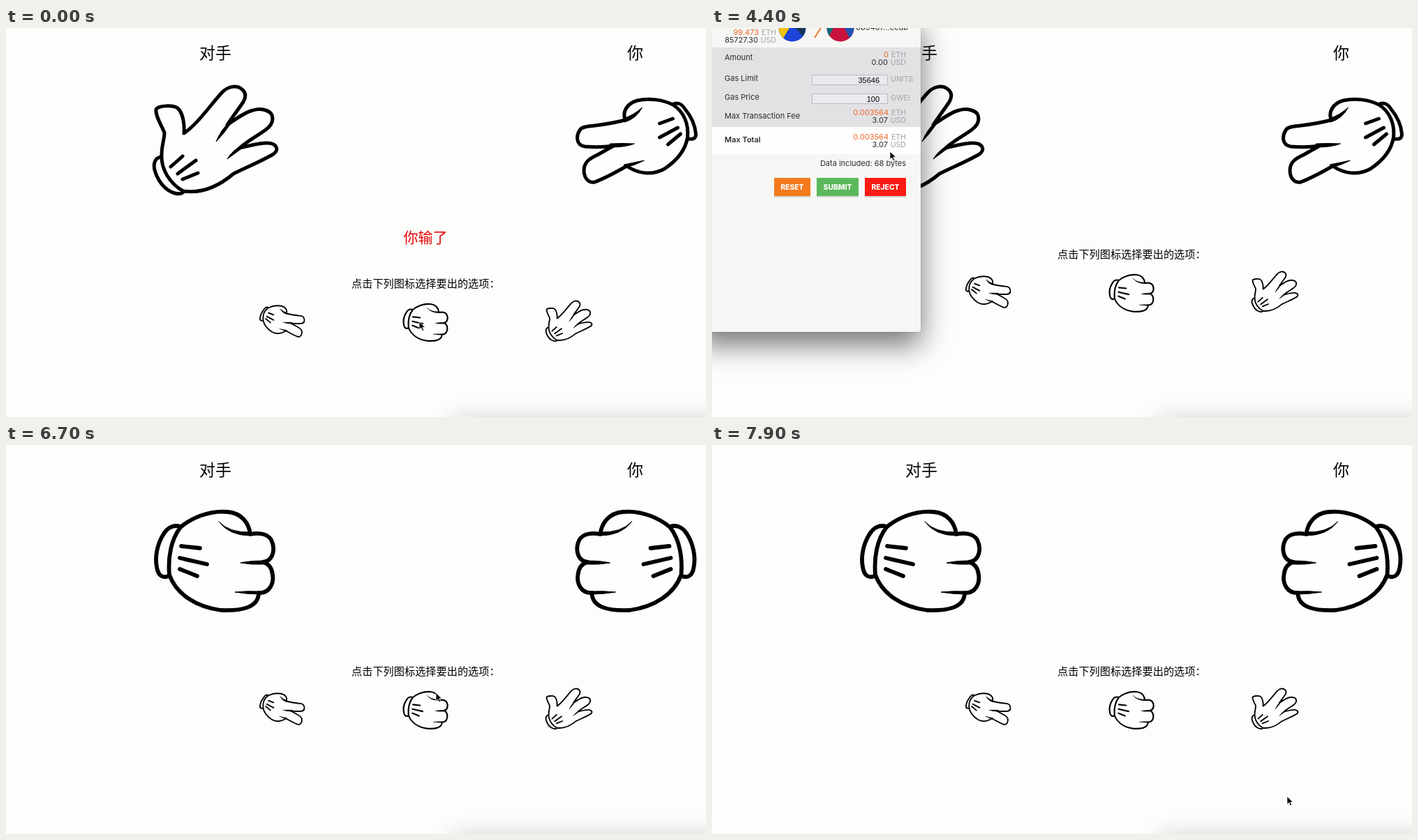
Recreate the animation shown at these times as an HTML page. Size 1003 by 558 pixels, loop 8 s.

```html
<!DOCTYPE html>
<html lang="zh-CN">
<head>
<meta charset="utf-8">
<style>
html, body { margin: 0; width: 100%; height: 100%; overflow: hidden; background: #fdfdfc; }
#stage { position: relative; width: 100%; height: 100%; overflow: hidden; contain: strict; }
svg { position: absolute; left: 0; top: 0; width: 100%; height: 100%; }
.cjk { font-family: "Noto Sans CJK SC", "Noto Sans CJK", sans-serif; }
.hand { fill: #fefefe; stroke: #000; stroke-width: 5; stroke-linecap: round; stroke-linejoin: round; }
#rock { stroke-width: 5.8; }
.wedge { fill: #000; stroke-width: 1; }
#edge { position: absolute; left: 640px; top: 562px; width: 420px; height: 40px; box-shadow: 0 0 36px rgba(0,0,0,.2); }
#popup { position: absolute; left: -20px; top: -20px; width: 319px; height: 456px; background: #fdfdfc;
  border-radius: 0 0 4px 0; box-shadow: 0 0 1px rgba(0,0,0,.6), 0 18px 42px rgba(0,0,0,.55); }
#form { left: 20px; top: 20px; width: 299px; height: 436px; font: 11px Inter, sans-serif; fill: #2c2c2c; }
#form .end { text-anchor: end; }
#form .eth { fill: #f0662b; }
#form .unit { fill: #a3a3a6; font-size: 10.6px; }
#form .btn { fill: #fff; font-weight: 800; font-size: 10.3px; text-anchor: middle; }
</style>
</head>
<body>
<div id="stage">
<div id="edge"></div>
<svg>
  <defs>
    <g id="scissors" class="hand">
      <path d="M245 109C238 106 233 109 228 117C219 128 214 141 213 152C213 159 217 160 224 159"/>
      <path d="M314 132C319 121 312 108 297 104C280 100 260 103 246 110C230 120 223 138 225 157C228 175 240 190 258 202C276 212 296 209 312 198C326 206 342 215 358 221C368 223 375 213 373 200C371 190 362 186 354 182L331 169C345 171 360 171 372 170C385 168 385 155 379 146C376 141 366 141 358 140C342 138 326 135 314 132Z"/>
      <path d="M265 137L246 130M265 157L239 143M253 167L235 152"/>
      <path class="wedge" d="M334 171Q314 171 301 166Q318 165 336 166ZM314 200Q300 197 287 190Q302 193 316 196ZM315 135Q298 130 290 114Q302 125 317 130Z"/>
    </g>
    <g id="rock" class="hand">
      <path d="M250 117C240 114 231 118 225 129C217 142 213 160 216 175C218 189 226 191 233 188"/>
      <path d="M350 128C348 112 338 98 318 96C290 93 264 106 250 118C236 136 232 162 234 186C244 214 272 232 308 237C336 238 362 234 362 212C378 213 384 198 382 186C381 176 376 170 368 168C384 166 386 148 380 136C374 126 360 126 350 128Z"/>
      <path d="M251 145L278 148M249 162L288 171M249 178L274 188"/>
      <path class="wedge" d="M305 110Q320 126 350 125L350 130Q320 130 305 110ZM368 166Q350 166 336 169Q352 172 368 171ZM362 210Q346 209 328 211Q346 214 362 214Z"/>
    </g>
    <g id="paper" class="hand">
      <path d="M222 185C213 186 210 196 214 207C219 222 230 234 242 237C249 239 253 237 255 234"/>
      <path d="M254 234C236 224 222 204 223 182C223 168 227 160 227 150C222 138 214 126 215 117C217 111 240 110 246 115C254 122 256 140 255 151C275 137 290 114 309 93C318 83 330 82 337 87C344 92 344 99 340 106C332 118 324 128 317 139C330 130 344 120 354 118C366 114 379 119 381 125C384 134 379 141 372 146C360 155 346 162 335 172C348 169 362 165 374 165C388 165 392 175 383 181C366 191 344 200 326 209C306 226 282 238 254 234Z"/>
      <path d="M236 199L253 184M246 209L272 190M253 217L275 208"/>
      <path class="wedge" d="M319 136Q308 146 301 163Q312 152 320 140ZM338 168Q324 176 317 188Q328 180 340 171Z"/>
    </g>
  </defs>
  <g class="cjk" font-size="23">
    <text x="277" y="43.5">对手</text>
    <text x="890" y="43.5">你</text>
    <text id="result" x="569.5" y="308" font-size="21" fill="#e60000">你输了</text>
  </g>
  <use id="foe"/>
  <use id="you" transform="translate(1201.5) scale(-1 1)"/>
  <g id="choices">
    <text class="cjk" x="495" y="371.5" font-size="15.2">点击下列图标选择要出的选项：</text>
    <use href="#scissors" transform="translate(284 360) scale(.375)"/>
    <use href="#rock" transform="translate(489 360) scale(.375)"/>
    <use href="#paper" transform="translate(694 360) scale(.375)"/>
  </g>
</svg>
<div id="popup">
  <svg id="form">
    <path fill="#f6f7f4" d="M0 0H299V432Q299 436 295 436H0Z"/>
    <path fill="#e2e2e5" d="M0 28H299V142H0Z"/>
    <path fill="#fefefe" d="M0 142H299V181H0Z"/>
    <circle cx="115" r="19.5" fill="#1d43d8"/>
    <path fill="#f3c20d" d="M95.500 0H111L102 14.500Q96 9 95.500 0Z"/>
    <path fill="#173457" d="M120 0H134Q134 6 130 12Z"/>
    <path d="M147 14L156 0" stroke="#f0762b" stroke-width="2"/>
    <circle cx="184" r="19.5" fill="#c8143c"/>
    <path fill="#1f56b0" d="M190 0H203.500Q203 9 197 14.500Z"/>
    <path fill="#0f6b7c" d="M164.500 0H174L168 11Q165 7 164.500 0Z"/>
    <text x="206" y="3">0b9467...ecdb</text>
    <g id="fields"></g>
  </svg>
</div>
<svg>
  <g id="cursor" stroke="#fff" stroke-linejoin="round">
    <path id="arrow" d="M0 0V11.500L2.700 9L4.800 13.500L6.800 12.600L4.800 8.300H8.500Z" stroke-width=".8"/>
    <path id="pointer" fill="#fff" stroke="#000" transform="translate(-2 .5)" d="M0 1Q1-1 2.300 1L4 5V3.500Q5.500 2.500 6 4.500Q7.500 3 8 5Q9.500 4 9.700 6.500Q10 10 8 13H3.500L-1.500 8Q-2 6 1.500 7.500Z"/>
  </g>
</svg>
</div>
<script>
const $ = id => document.getElementById(id);
const label = (x, y, str, cls = '') => `<text x="${x}" y="${y}" class="${cls}">${str}</text>`;

// One amount in ETH with its value in USD below
const amount = (right, y, eth, usd) =>
  label(right, y, eth, 'end eth') + label(right + 25, y, 'ETH', 'end unit') +
  label(right - 1, y + 11, usd, 'end') + label(right + 25, y + 11, 'USD', 'end unit');

const input = (y, value, unit) =>
  `<path d="M143.5 ${y + .5}h108v14h-108z" fill="#ebebee" stroke="#b8b8d0"/>
   <text x="240" y="${y + 12}" class="end" fill="#000" font-family="Liberation Sans, sans-serif">${value}</text>` +
  label(256, y + 10, unit, 'unit');

const button = (x, w, color, str) =>
  `<path d="M${x} 217h${w}v26h-${w}z" fill="#000" opacity=".14"/>
   <path d="M${x} 215h${w}v26h-${w}z" fill="${color}"/>` + label(x + w / 2, 232, str, 'btn');

$('fields').innerHTML =
  amount(67, 10, '99.473', '85727.30') +
  label(18, 46, 'Amount') + amount(253, 42, '0', '0.00') +
  label(18, 76, 'Gas Limit') + input(67, 35646, 'UNITS') +
  label(18, 103, 'Gas Price') + input(94, 100, 'GWEI') +
  label(18, 130, 'Max Transaction Fee') + amount(253, 125, '0.003564', '3.07') +
  `<g font-weight="600">${label(18, 164, 'Max Total')}</g>` + amount(253, 160, '0.003564', '3.07') +
  label(278, 198, 'Data included: 68 bytes', 'end') +
  button(89, 52, '#f47a1c', 'RESET') + button(150, 60, '#5cb85c', 'SUBMIT') + button(219, 59, '#fc1a14', 'REJECT');

const LOOP = 8000, CLICK = 2500, OPEN = 3200, LOADED = 3700, CLOSE = 5500;
const shapes = ['scissors', 'rock', 'paper'];

// Cursor stops: time, x, y
const stops = [
  [0, 592, 421], [2600, 592, 421], [3200, 491, 305], [3600, 491, 305], [4400, 255, 177],
  [4900, 180, 228], [5400, 180, 228], [6100, 495, 261], [6300, 495, 261],
  [7100, 737, 450], [7900, 824, 504], [LOOP, 824, 504]
];

function cursorAt(t) {
  const i = stops.findIndex(s => s[0] > t);
  const [t0, x0, y0] = stops[i - 1], [t1, x1, y1] = stops[i];
  const k = (t - t0) / (t1 - t0), e = k * k * (3 - 2 * k);
  return [x0 + (x1 - x0) * e, y0 + (y1 - y0) * e];
}

const show = (id, on) => $(id).style.display = on ? '' : 'none';

function draw(now) {
  const step = Math.floor(now % LOOP / 100), t = step * 100;
  const spin = shapes[step % 3], spinning = t > CLOSE;
  $('foe').setAttribute('href', '#' + (spinning ? spin : 'paper'));
  $('you').setAttribute('href', '#' + (spinning ? spin : 'scissors'));
  show('result', t < CLICK);
  $('choices').setAttribute('transform', `translate(0 ${t < CLICK ? 0 : -42})`);
  show('popup', t >= OPEN && t < CLOSE);
  show('form', t >= LOADED);
  const pointing = t >= 1000 && t < 2700;
  show('arrow', !pointing);
  show('pointer', pointing);
  $('cursor').setAttribute('transform', `translate(${cursorAt(t)})`);
  requestAnimationFrame(draw);
}
requestAnimationFrame(draw);
</script>
</body>
</html>
```
